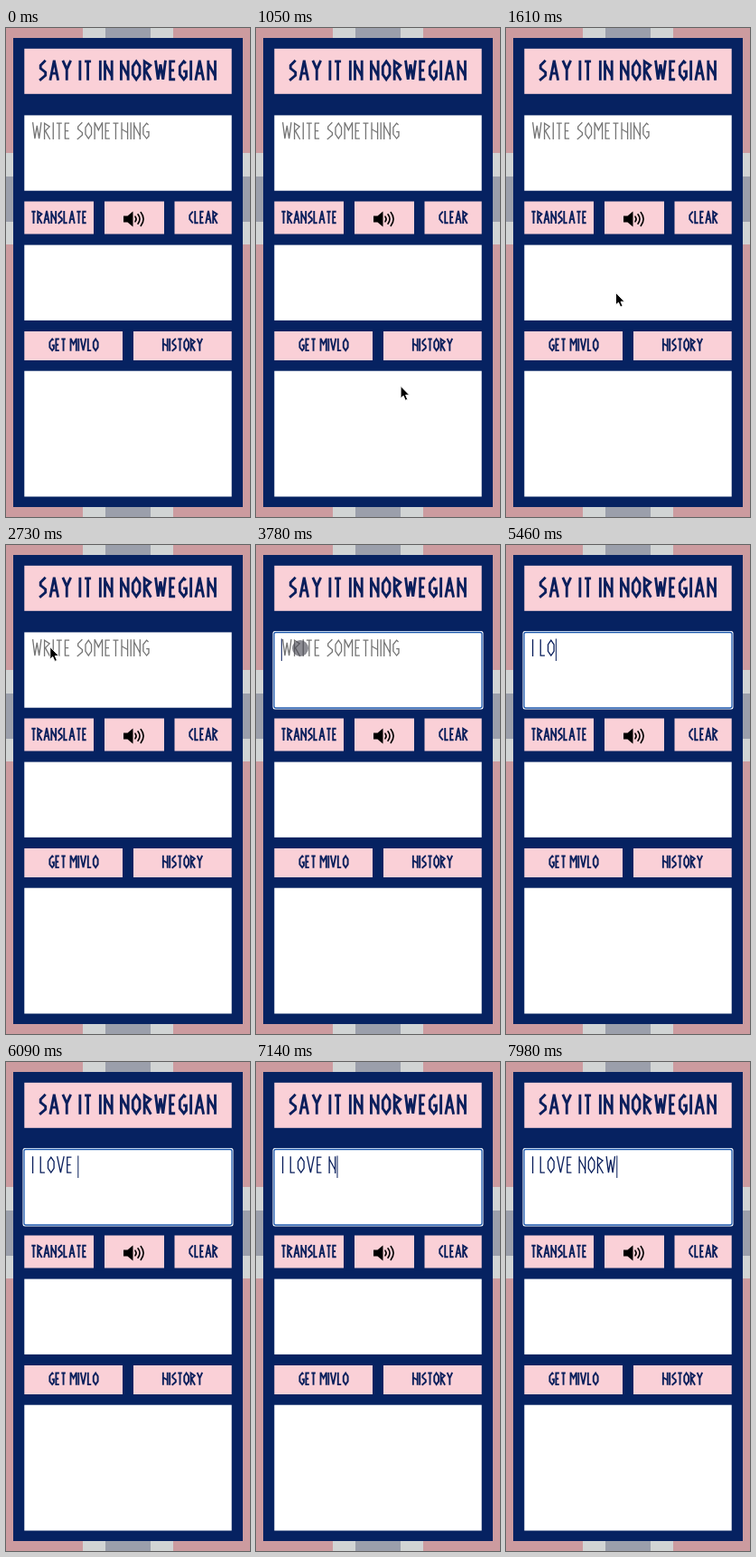
An HTML page for the animation above (8 s loop, 270 px wide and 540 px high).

```html
<!DOCTYPE html>
<html lang="en">
<head>
<meta charset="utf-8">
<title>Say it in Norwegian</title>
<style>
  html, body { margin: 0; width: 100%; height: 100%; overflow: hidden; background: #cc9b9f; }
  svg { display: block; width: 100vw; height: 100vh; }
  .lettering { fill: none; stroke-linejoin: miter; stroke-linecap: butt; }
</style>
</head>
<body>
<svg id="stage" viewBox="0 0 270 540">
  <g id="page"></g>
  <g id="focus">
    <rect x="18.5" y="95" width="233" height="86.5" rx="2.5" fill="#fff"/>
    <rect x="20" y="96.5" width="230" height="83.5" rx="2" fill="#fff" stroke="#1b57ad" stroke-width="1.3"/>
  </g>
  <g id="hint"></g>
  <g id="typed"></g>
  <rect id="caret" y="103.5" width="1" height="24.5" fill="#0a1f5c"/>
  <circle id="press" cx="49" cy="114" fill="#454550" fill-opacity=".62"/>
  <path id="arrow" d="M0 0V13.5L3 10.8L5.2 15.8L7.6 14.8L5.5 9.9H9.6Z" fill="#000" stroke="#fff" stroke-width=".9"/>
  <path id="mover" d="M0-7.5L3-4H1V-1H4V-3L7.5 0L4 3V1H1V4H3L0 7.5L-3 4H-1V1H-4V3L-7.5 0L-4-3V-1H-1V-4H-3Z"
        transform="translate(48 114)" fill="#000" stroke="#fff" stroke-width=".7" paint-order="stroke"/>
</svg>
<script>
const LOOP = 8000;
const NAVY = '#0a1f5c', PINK = '#fad0d7', PANEL = '#062261';
const $ = id => document.getElementById(id);

// Rune-style capitals as strokes: [width, path], 20 units tall.
const RUNES = {
  A: [8, 'M0 20L4 0L8 20M1.5 13H6.5'],
  C: [5, 'M5 1L0 7V13L5 19'],
  E: [5, 'M5 1H0V19H5M0 10H4'],
  G: [6.5, 'M6 3L4 1L0 6V14L4 19L6.5 16V11H3.5'],
  H: [7, 'M0 0V20M7 0V20M0 8L7 12'],
  I: [0, 'M0 0V20'],
  L: [5, 'M0 0V19H5'],
  M: [9, 'M0 20V0L4.5 9L9 0V20'],
  N: [7, 'M0 20V0M0 3L7 16M7 0V20'],
  O: [7, 'M3.5 1L7 6V14L3.5 19L0 14V6Z'],
  R: [6.5, 'M0 20V1L6 5L1 10L6.5 20'],
  S: [6, 'M6 0L1 5V8L6 12V15L0 20'],
  T: [6.4, 'M0 1H6.4M3.2 1V20'],
  V: [8, 'M0 0L4 19L8 0'],
  W: [10, 'M0 0L2.5 19L5 4L7.5 19L10 0'],
  Y: [8, 'M0 0L4 9L8 0M4 9V20'],
  ' ': [0, '']
};

const HEADING = { size: 1.1, gap: 4.7, space: -.1, weight: 2.6, color: NAVY };
const BUTTON = { size: .7, gap: 3.5, space: 1.2, weight: 2.7, color: NAVY };
const INPUT = { size: .94, gap: 3.8, space: 1.6, weight: 1.4, color: NAVY };
const HINT = { ...INPUT, color: '#757575' };

const advance = (char, style) => RUNES[char][0] + style.gap + (char === ' ' ? style.space : 0);
const measure = (text, style) =>
  [...text].reduce((sum, char) => sum + advance(char, style), 0) * style.size;

function lettering(text, x, middle, style) {
  let pen = 0;
  const glyphs = [...text].map(char => {
    const glyph = `<path d="${RUNES[char][1]}" transform="translate(${pen})"/>`;
    pen += advance(char, style);
    return glyph;
  }).join('');
  return `<g class="lettering" role="img" aria-label="${text}" stroke="${style.color}"
    stroke-width="${style.weight}" transform="translate(${x} ${middle - 10 * style.size})
    scale(${style.size})">${glyphs}</g>`;
}

function centred(text, center, middle, style) {
  const width = measure(text, style) - style.gap * style.size;
  return lettering(text, center - width / 2, middle, style);
}

const rect = (x, y, w, h, fill) =>
  `<rect x="${x}" y="${y}" width="${w}" height="${h}" fill="${fill}"/>`;

const speaker = `<g transform="translate(130 211)">
  <path d="M0-3.5H4.5L10.5-8.5V8.5L4.5 3.5H0Z"/>
  <path d="M13-2.8Q15.2 0 13 2.8M16-5.2Q20 0 16 5.2M19.2-7.4Q25 0 19.2 7.4"
    fill="none" stroke="#000" stroke-width="1.6" stroke-linecap="round"/></g>`;

$('page').innerHTML = [
  rect(0, 0, 270, 540, '#cc9b9f'),
  rect(85, 0, 100, 540, '#d1d4d4'), rect(0, 138, 270, 101, '#d1d4d4'),
  rect(110, 0, 50, 540, '#9b9fab'), rect(0, 164, 270, 50, '#9b9fab'),
  rect(8, 11, 254, 518, PANEL),
  rect(20.3, 22.8, 229.4, 50, PINK),
  rect(20.3, 96.4, 229.4, 83.3, '#fff'),
  rect(20.3, 191.5, 76.7, 36, PINK), rect(109, 191.5, 66, 36, PINK), rect(186.5, 191.5, 63.2, 36, PINK),
  rect(20.3, 239.6, 229.4, 83.3, '#fff'),
  rect(20.3, 335, 108.7, 32, PINK), rect(141, 335, 108.7, 32, PINK),
  rect(20.3, 378.7, 229.4, 138.8, '#fff'),
  centred('SAY IT IN NORWEGIAN', 134.3, 46.8, HEADING),
  centred('TRANSLATE', 58.5, 209, BUTTON),
  centred('CLEAR', 218.5, 209, BUTTON),
  centred('GET MIVLO', 75, 349.8, BUTTON),
  centred('HISTORY', 195.5, 349.8, BUTTON),
  speaker
].join('');

const TEXT_X = 29.6, TEXT_Y = 113.6;
$('hint').innerHTML = lettering('WRITE SOMETHING', TEXT_X, TEXT_Y, HINT);

const MESSAGE = 'I LOVE NORW';
const KEY_TIMES = [4830, 4970, 5180, 5460, 5670, 5880, 6090, 7140, 7280, 7630, 7840];
const FOCUS_TIME = 3570;

const clamp = v => Math.min(1, Math.max(0, v));
const progress = (t, from, to) => clamp((t - from) / (to - from));
const easeOut = p => 1 - (1 - p) ** 2;
const easeInOut = p => p * p * (3 - 2 * p);
const mix = (a, b, p) => a + (b - a) * p;
const within = (t, from, to) => t >= from && t < to;
const show = (id, visible) => $(id).setAttribute('visibility', visible ? 'visible' : 'hidden');

function pointer(t) {
  if (t < 1960) {
    const p = easeOut(progress(t, 740, 1610));
    return [mix(215, 121.5, p), mix(542, 292.3, p)];
  }
  const p = easeInOut(progress(t, 1900, 2730));
  return [mix(121.5, 48.8, p), mix(292.3, 112.6, p)];
}

let shownCount = -1;
function render(t) {
  const count = KEY_TIMES.filter(time => time <= t).length;
  const text = MESSAGE.slice(0, count);
  if (count !== shownCount) {
    $('typed').innerHTML = lettering(text, TEXT_X, TEXT_Y, INPUT);
    const left = TEXT_X - INPUT.gap * INPUT.size / 2;
    $('caret').setAttribute('x', left + measure(text, INPUT));
    shownCount = count;
  }
  const caretOff = within(t, 4480, 4830) || within(t, 6510, 7000);
  show('focus', t >= FOCUS_TIME);
  show('hint', count === 0);
  show('caret', t >= FOCUS_TIME && !caretOff);

  show('arrow', within(t, 770, FOCUS_TIME));
  $('arrow').setAttribute('transform', `translate(${pointer(t)})`);
  show('press', within(t, FOCUS_TIME, 4340));
  $('press').setAttribute('r', mix(5, 9, easeOut(progress(t, FOCUS_TIME, 3780))));
  show('mover', within(t, 4340, KEY_TIMES[0]));
}

const start = performance.now();
function tick() {
  render((performance.now() - start) % LOOP);
  requestAnimationFrame(tick);
}
tick();
</script>
</body>
</html>
```
